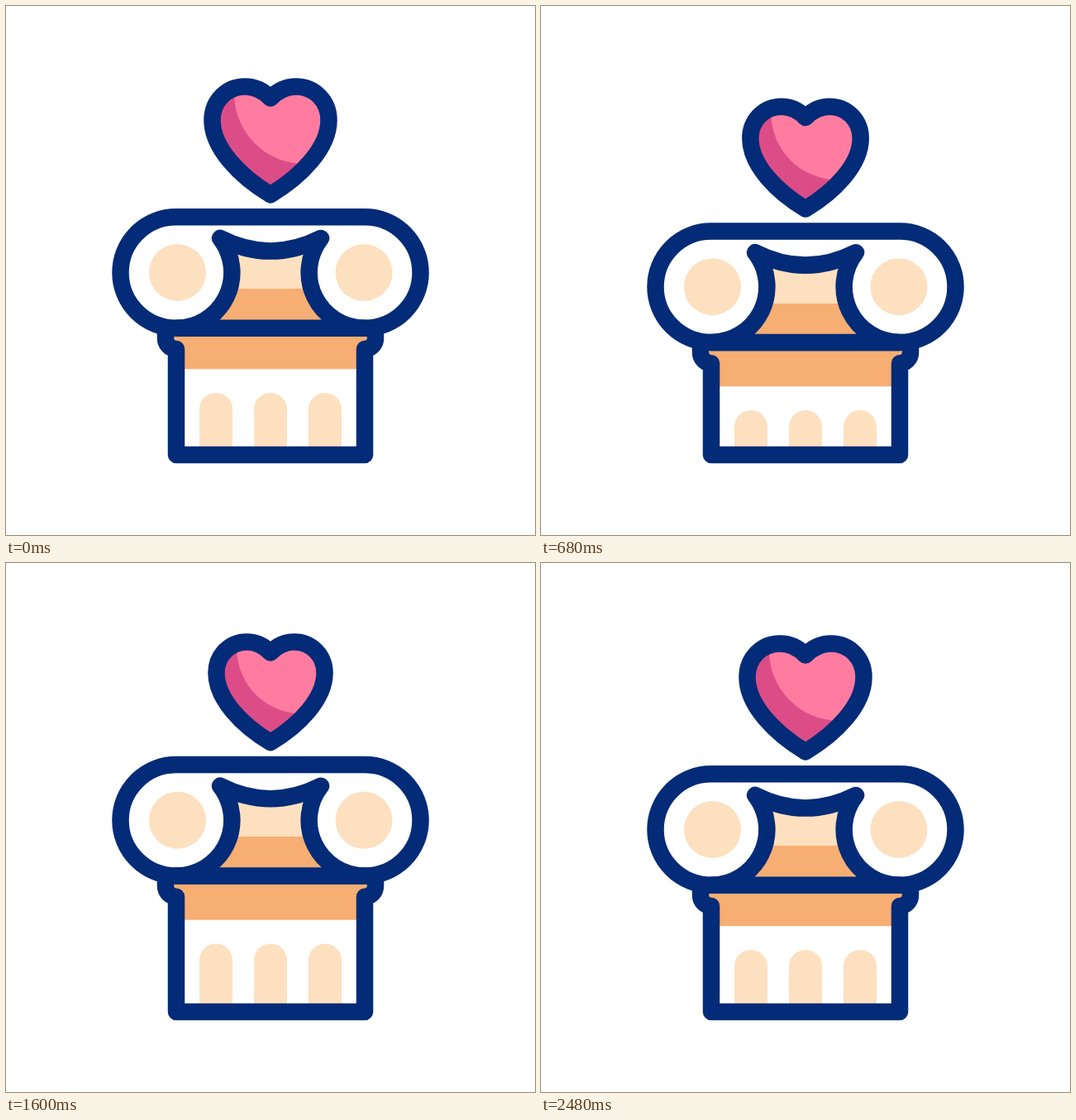
An HTML page for the animation above (3 s loop, 640 by 640 pixels).

```html
<!DOCTYPE html>
<html lang="en">
<head>
<meta charset="utf-8">
<title>Column and heart</title>
<style>
  html, body { margin: 0; height: 100%; overflow: hidden; background: #fff; }
  svg { display: block; width: 100vw; height: 100vh; }
  .line { fill: none; stroke: #032b77; stroke-width: 20.5; stroke-linecap: round; stroke-linejoin: round; }
  .ray { stroke: #ffce51; stroke-width: 20.5; stroke-linecap: round; }
  .light { fill: #fde0bf; }
  .mid { fill: #f6ae72; }
</style>
</head>
<body>
<svg viewBox="0 0 640 640">
  <defs>
    <linearGradient id="neck" gradientUnits="userSpaceOnUse" x1="0" y1="242.5" x2="0" y2="442.5">
      <stop offset=".5" stop-color="#fde0bf"/>
      <stop offset=".5" stop-color="#f6ae72"/>
    </linearGradient>
    <path id="shape" d="M320 111.5C312 103 301 97.5 289 97.5C267 97.5 249.5 115 249.5 138C249.5 172 283 206 320 228.3C357 206 390.5 172 390.5 138C390.5 115 373 97.5 351 97.5C339 97.5 328 103 320 111.5Z"/>
    <clipPath id="inside"><use href="#shape"/></clipPath>
  </defs>

  <path id="band" class="mid"/>
  <path id="arches" class="light"/>
  <path id="walls" class="line"/>

  <g id="capital">
    <rect class="line" x="138.5" y="255.3" width="363" height="134.4" rx="67.2" style="fill:#fff"/>
    <path class="line" style="fill:url(#neck)" d="M205.7 389.7A67.2 67.2 0 0 0 259 281Q320 312 381 281A67.2 67.2 0 0 0 434.3 389.7Z"/>
    <circle class="light" cx="207.5" cy="322.5" r="34.5"/>
    <circle class="light" cx="433" cy="322.5" r="34.5"/>
  </g>

  <g id="rays"></g>

  <g id="heart">
    <use href="#shape" fill="#dc4d88"/>
    <circle cx="361" cy="106" r="85" fill="#ff7ca0" clip-path="url(#inside)"/>
    <path id="edge" class="line" vector-effect="non-scaling-stroke"/>
  </g>
</svg>
<script>
const $ = id => document.getElementById(id);
const set = (el, attrs) => { for (const k in attrs) el.setAttribute(k, attrs[k]); };

const LOOP = 3000, STEP = 40;

// Keys are [time, value] pairs
const shiftKeys = [[200, 0], [480, 25.5], [1240, -26], [1435, -26], [1880, 22.7], [2480, 0]];
const bandKeys = [[200, 0], [480, 29.5], [1240, -23], [1435, -23], [1880, 28], [2480, 0]];
const scaleKeys = [[200, 1], [480, .91], [1240, 1.134], [1760, .873], [1880, .873], [2480, 1]];

// Start point, direction, full length and start time of each ray
const d = Math.SQRT1_2;
const rays = [
  [431.5, 93, d, -d, 81, 1120], [435.5, 120, 1, 0, 82, 1120], [434, 147, d, d, 81, 1120],
  [195.5, 93.5, -d, -d, 84, 1200], [195.5, 120, -1, 0, 84, 1200], [198, 147, -d, d, 84, 1200]
].map(ray => {
  const el = document.createElementNS("http://www.w3.org/2000/svg", "line");
  set(el, { class: "ray" });
  $("rays").append(el);
  return [el, ...ray];
});

function ease(t, start, end) {
  const p = Math.min(1, Math.max(0, (t - start) / (end - start)));
  return (1 - Math.cos(Math.PI * p)) / 2;
}

function at(keys, t) {
  let value = keys[0][1];
  for (let i = 1; i < keys.length; i++) {
    const [t0, v0] = keys[i - 1], [t1, v1] = keys[i];
    value += (v1 - v0) * ease(t, t0, t1);
  }
  return value;
}

function render(t) {
  const y = at(shiftKeys, t), b = at(bandKeys, t), s = at(scaleKeys, t);

  set($("capital"), { transform: `translate(0 ${y})` });
  set($("heart"), { transform: `translate(320 ${228.3 + y}) scale(${s}) translate(-320 -228.3)` });
  set($("walls"), {
    d: `M193 ${390 + y}v12a13 13 0 0 0 13 13V543H434V${415 + y}a13 13 0 0 0 13 -13v-12`
  });
  set($("band"), { d: `M200 ${390 + y}H440v18H434V${439.3 + b}H206V${408 + y}H200Z` });
  set($("arches"), {
    d: [234, 300, 366].map(x => `M${x} 543V${488 + b}a20 20 0 0 1 40 0V543Z`).join("")
  });

  for (const [el, x0, y0, dx, dy, len, start] of rays) {
    const head = len * ease(t, start, start + 200);
    const tail = len * ease(t, start + 160, start + 360);
    set(el, {
      x1: x0 + dx * tail, y1: y0 + dy * tail,
      x2: x0 + dx * head, y2: y0 + dy * head,
      visibility: head - tail > .01 ? "visible" : "hidden"
    });
  }
}

function tick() {
  const t = performance.now() % LOOP;
  render(Math.floor(t / STEP) * STEP);
  requestAnimationFrame(tick);
}

set($("edge"), { d: $("shape").getAttribute("d") });
tick();
</script>
</body>
</html>
```
